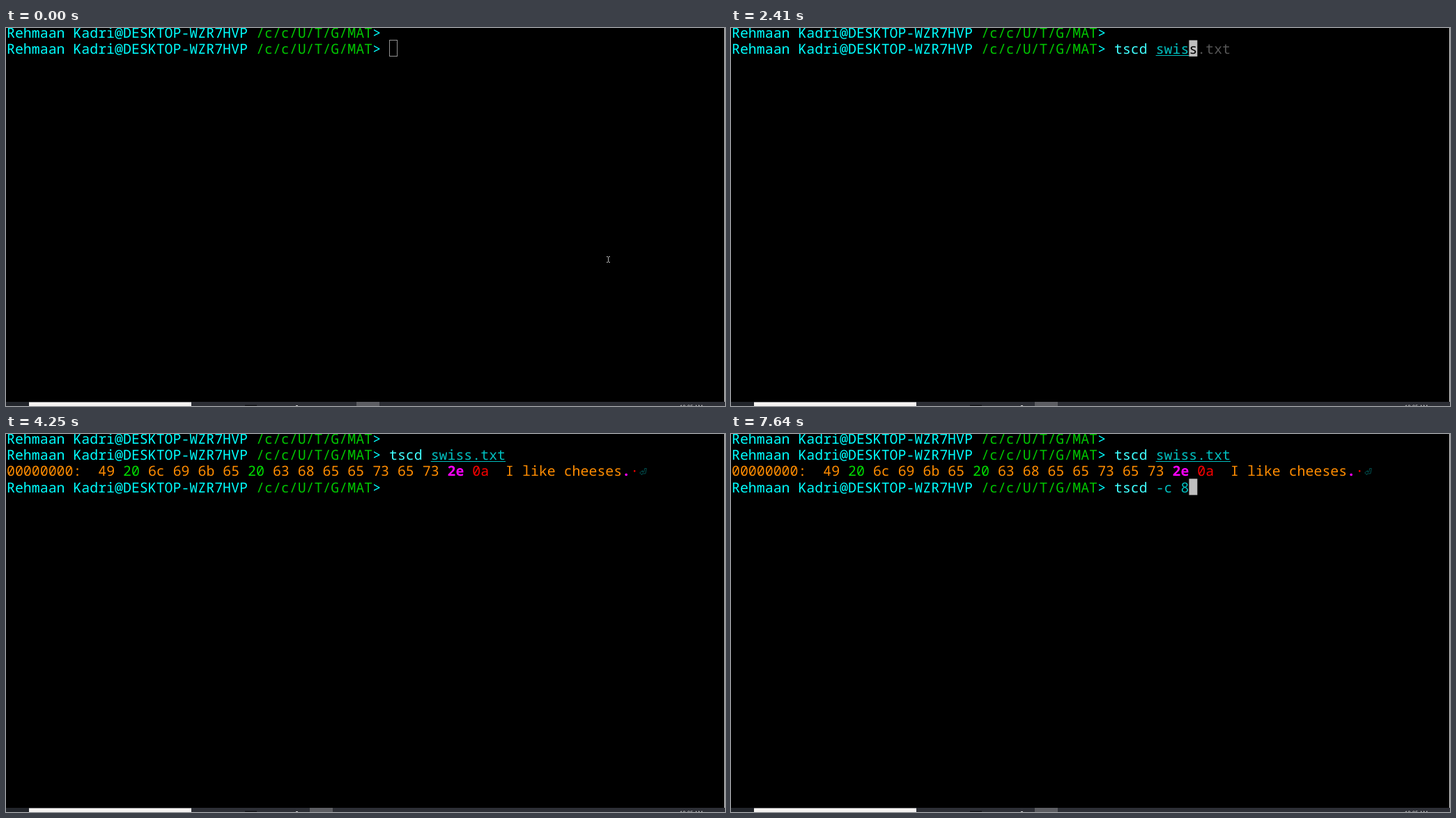
Write an HTML page that moves like this. It is 1032 px wide and 543 px high and loops after 8 s.

```html
<!DOCTYPE html>
<html lang="en">
<head>
<meta charset="utf-8">
<title>Terminal session</title>
<style>
  html, body { margin: 0; width: 100%; height: 100%; overflow: hidden; background: #000; }
  svg { display: block; width: 1032px; height: 543px; }
  text { white-space: pre; text-rendering: geometricPrecision; }
  #screen { font: 19.89px "Noto Sans Mono", "DejaVu Sans Mono", monospace; }
</style>
</head>
<body>
<svg viewBox="0 0 1032 543">
  <rect width="1032" height="543" fill="#000"/>
  <g id="screen"></g>
  <path id="mouse" d="M862 328.5h2m1 0h2M864.5 329v7M862 336.5h2m1 0h2" stroke="#b4b4b4" fill="none"/>
  <g id="taskbar">
    <rect y="537" width="1032" height="6" fill="#2d2f36"/>
    <rect y="537" width="33" height="6" fill="#22252b"/>
    <rect x="33" y="537.5" width="233" height="5.5" fill="#f5f3f2"/>
    <rect x="343" y="541.5" width="17" height="1.5" fill="#101114"/>
    <rect x="416" y="542" width="3" height="1" fill="#d0d0d0"/>
    <rect id="oldTask" x="503" y="537" width="33" height="6" fill="#5d5e63"/>
    <rect id="newTask" x="436" y="537" width="33" height="6" fill="#5d5e63"/>
    <text x="967" y="547" font-family="Open Sans, sans-serif" font-size="7.6" fill="#f0f0f0">10:05 AM</text>
  </g>
  <rect x="1031" width="1" height="537" fill="#d8d8d8"/>
</svg>
<script>
const LOOP = 8000, CELL = 11.935, LINE = 23.36, PROMPT_LEN = 46;
const C = {
  name: '#00ffff', path: '#00c400', cmd: '#40ffff', arg: '#00bfbf', bad: '#ff4040',
  ghost: '#555555', cursor: '#bfbfbf', hex: '#ff8c00', space: '#00dc00',
  dot: '#ff00ff', ctrl: '#ff0000', mark: '#005050'
};
const FILE = 'swiss.txt', OPTS = '-c 14 ' + FILE;

// time, row, typed, suggestion, cursor, colours not yet updated
const steps = [
  [0, 1, '', '', 'box'],
  [150, 1, '', '', 'on'],
  [400, 1, 't', '', 'on'],
  [480, 1, 't', 'scd ' + OPTS, 'on'],
  [620, 1, 'ts', 'cd ' + OPTS, 'on'],
  [700, 1, 'tsc', 'd ' + OPTS, 'on'],
  [780, 1, 'tscd', ' ' + OPTS, 'on', true],
  [870, 1, 'tscd', ' ' + OPTS, 'on'],
  [950, 1, 'tscd ', OPTS, 'on'],
  [1570, 1, 'tscd ', OPTS, 'off'],
  [1650, 1, 'tscd s', '', 'on', true],
  [1740, 1, 'tscd s', 'wiss.txt', 'on'],
  [2050, 1, 'tscd sw', 'iss.txt', 'on'],
  [2240, 1, 'tscd swi', 'ss.txt', 'on'],
  [2410, 1, 'tscd swis', 's.txt', 'on'],
  [2500, 1, 'tscd swiss', '.txt', 'on'],
  [2650, 1, 'tscd swiss.', 'txt', 'on'],
  [2810, 1, 'tscd swiss.t', 'xt', 'on'],
  [2900, 1, 'tscd swiss.tx', 't', 'on'],
  [3070, 1, 'tscd swiss.txt', '', 'on'],
  [3150, 2, '', '', 'on'],
  [3470, 2, 'dump', '', 'on'],
  [3700, 3, '', '', 'on'],
  [4250, 3, '', '', 'off'],
  [4520, 3, 't', '', 'on'],
  [4600, 3, 't', 'scd ' + FILE, 'on'],
  [4670, 3, 'ts', 'cd ' + FILE, 'on'],
  [4900, 3, 'tsc', 'd ' + FILE, 'on'],
  [5050, 3, 'tscd', ' ' + FILE, 'on'],
  [5380, 3, 'tscd ', FILE, 'on'],
  [5710, 3, 'tscd -', '', 'on'],
  [5770, 3, 'tscd -c', ' 14 ' + FILE, 'on'],
  [6330, 3, 'tscd -c', ' 14 ' + FILE, 'off'],
  [6800, 3, 'tscd -c', ' 14 ' + FILE, 'on'],
  [7310, 3, 'tscd -c ', '14 ' + FILE, 'on'],
  [7640, 3, 'tscd -c 8', '', 'on']
];

const $ = id => document.getElementById(id);
const colX = col => 1 + col * CELL;
const rowY = row => -5.8 + row * LINE;

function put(row, col, str, fill, bold) {
  const weight = bold ? ' font-weight="700"' : '';
  return `<text x="${colX(col)}" y="${rowY(row) + 19.4}" fill="${fill}"${weight}>${str}</text>`;
}

function prompt(row) {
  return put(row, 0, 'Rehmaan Kadri@DESKTOP-WZR7HVP', C.name) +
    put(row, 30, '/c/c/U/T/G/MAT', C.path) + put(row, 44, '&gt;', C.name);
}

function command(row, typed, ghost, stale) {
  const [cmd, ...rest] = typed.split(' ');
  const arg = rest.join(' '), argCol = PROMPT_LEN + 5;
  const valid = cmd === 'tscd' && !(stale && !arg);
  let out = put(row, PROMPT_LEN, cmd, valid ? C.cmd : C.bad);
  out += put(row, argCol, arg, C.arg);
  if (arg[0] === 's' && !stale)
    out += `<rect x="${colX(argCol)}" y="${Math.round(rowY(row) + 21)}" width="${arg.length * CELL}" height="1" fill="${C.arg}"/>`;
  return out + put(row, PROMPT_LEN + typed.length, ghost, C.ghost);
}

function cursor(row, col, mode, under) {
  const x = colX(col), y = rowY(row);
  if (mode === 'off') return '';
  if (mode === 'box')
    return `<rect x="550.5" y="17.5" width="11" height="23" fill="none" stroke="#929292"/>`;
  return `<rect x="${x}" y="${y}" width="${CELL}" height="${LINE}" fill="${C.cursor}"/>` +
    put(row, col, under, '#000');
}

function dump(row) {
  const tint = ch => ch === ' ' ? C.space : ch === '.' ? C.dot : ch === '\n' ? C.ctrl : C.hex;
  let out = put(row, 0, '00000000:', C.hex);
  [...'I like cheeses.\n'].forEach((ch, i) => {
    const hex = ch.charCodeAt(0).toString(16).padStart(2, '0');
    const bold = ch === '.';
    out += put(row, 11 + i * 3, hex, tint(ch), bold);
    out += put(row, 60 + i, ch === '\n' ? '·' : ch, tint(ch), bold);
  });
  return out;
}

function returnMark() {
  return `<path d="M919.3 49.5h-2.6l-1 5h-2.2l.4-2-4.2 3.2 3 3.2.4-2h4.8z" fill="none" stroke="${C.mark}"/>`;
}

function draw([, row, typed, ghost, mode, stale]) {
  let out = prompt(0) + prompt(1);
  if (row > 1) out += command(1, 'tscd ' + FILE, '');
  if (row === 3) out += dump(2) + returnMark() + prompt(3);
  if (row === 2) {
    if (typed) out += dump(2);
    out += cursor(2, typed ? 76 : 0, mode, '');
  } else {
    out += command(row, typed, ghost, stale);
    out += cursor(row, PROMPT_LEN + typed.length, mode, ghost.slice(0, 1));
  }
  $('screen').innerHTML = out;
}

let shown;
function tick(now) {
  const t = now % LOOP;
  const step = steps.findLast(s => s[0] <= t);
  if (step !== shown) draw(shown = step);
  $('mouse').style.opacity = t < 400 ? 1 : 0;
  const focus = t < 70 ? 0 : t < 150 ? 0.5 : 1;
  $('oldTask').style.opacity = 1 - focus;
  $('newTask').style.opacity = focus;
  requestAnimationFrame(tick);
}
tick(performance.now());
</script>
</body>
</html>
```
